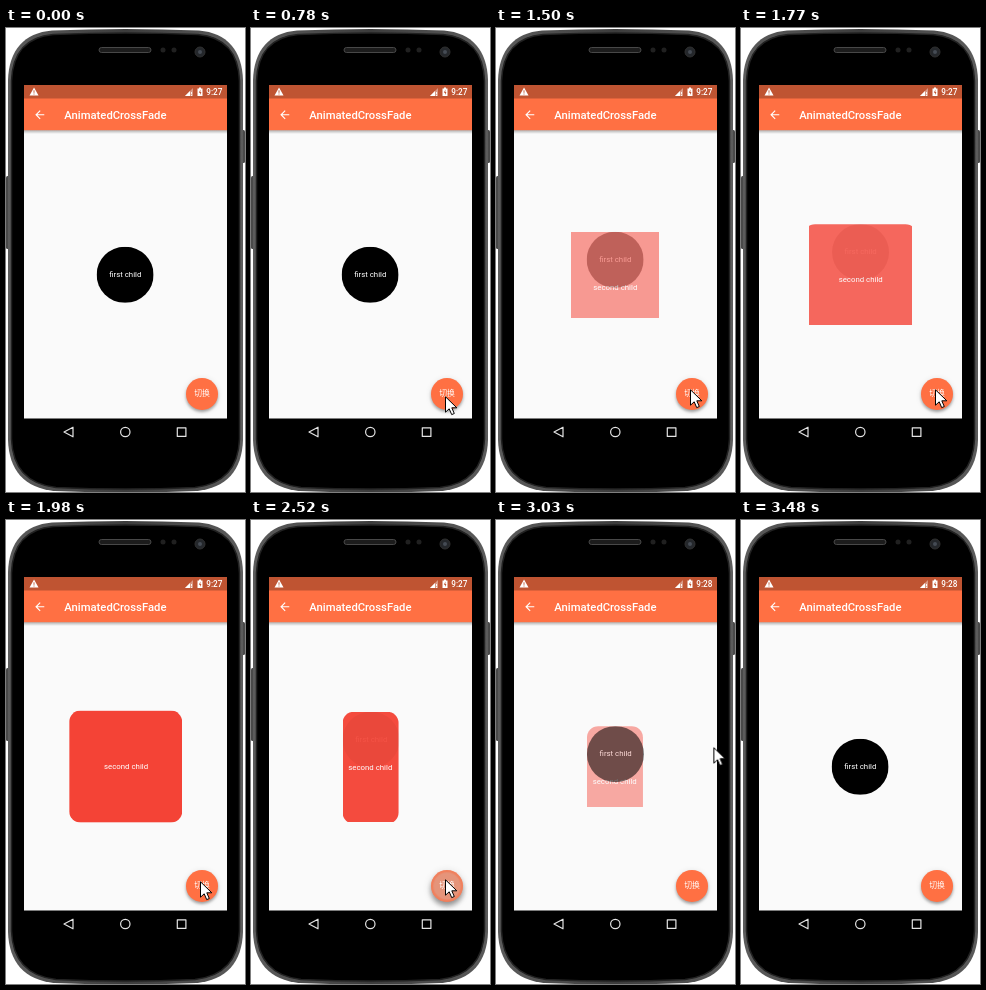
Animation of 239x464 px, one loop 3.96 s. Source, as an HTML page:

```html
<!DOCTYPE html>
<html lang="en">
<head>
<meta charset="utf-8">
<title>Cross fade demo</title>
<style>
  :root { --loop: 3960ms; --small: 56.4px; --large: 112.8px; --accent: #ff7043; }
  html, body { margin: 0; width: 100%; height: 100%; overflow: hidden; background: #fff; }
  body { position: relative; font: 7.84px Roboto, "Noto Sans CJK SC", "Noto Sans CJK", sans-serif; color: #fff; }
  svg, div { position: absolute; }
  svg { left: 0; top: 0; overflow: visible; }
  svg text { fill: #fff; font-weight: 500; }
  .size, .first, .second, .fab, .fab *, .cursor, .clock { animation: var(--loop) linear infinite; }

  /* Cross fade: forward 970-1970 ms, reverse 2480-3480 ms */
  .size {
    left: 119.3px; top: 246.5px; width: var(--small); height: var(--small);
    transform: translate(-50%, -50%); overflow: hidden; animation-name: size;
  }
  .first, .second { left: 50%; top: 0; transform: translateX(-50%); text-align: center; white-space: nowrap; }
  .first {
    width: var(--small); height: var(--small); line-height: var(--small);
    border-radius: 50%; background: #000; animation-name: first;
  }
  .second {
    width: var(--large); height: var(--large); line-height: var(--large);
    border-radius: 11.3px; background: #f44336; animation-name: second;
  }
  @keyframes size {
    0%, 24.495%, 87.879%, 100% { width: var(--small); height: var(--small); }
    49.747%, 62.626% { width: var(--large); height: var(--large); }
  }
  @keyframes first {
    0%, 24.495%, 87.879%, 100% { opacity: 1; }
    49.747%, 62.626% { opacity: 0; }
  }
  /* The outgoing child drops behind and takes the narrow width */
  @keyframes second {
    0%, 24.495% { opacity: 0; z-index: 1; width: var(--large); }
    49.747%, 62.626% { opacity: 1; z-index: 1; width: var(--large); }
    62.627% { opacity: 1; z-index: 0; width: var(--small); }
    87.879%, 100% { opacity: 0; z-index: 0; width: var(--small); }
  }

  .fab {
    left: 180.2px; top: 350px; width: 31.6px; height: 31.6px; border-radius: 50%;
    background: var(--accent); animation-name: lift;
  }
  .fab div { inset: 0; border-radius: 50%; text-align: center; line-height: 32px; }
  .ink { overflow: hidden; }
  .glow { background: #bcbcbc; opacity: 0; animation-name: glow; }
  .splash { background: #c8c8c8; opacity: 0; animation-name: splash; }
  @keyframes lift {
    0%, 24.2%, 31%, 59.1%, 69%, 100% { box-shadow: 0 2px 3px rgba(0,0,0,.32), 0 1px 6px rgba(0,0,0,.1); }
    26%, 62%, 64.5% { box-shadow: 0 4px 5px rgba(0,0,0,.34), 0 2px 9px rgba(0,0,0,.16); }
  }
  @keyframes glow {
    0%, 24.5%, 30.3%, 60%, 68.5%, 100% { opacity: 0; }
    26.5%, 62.6%, 64% { opacity: .22; }
  }
  @keyframes splash {
    0%, 24.5% { opacity: 0; transform: translateY(-6px) scale(.1); }
    25% { opacity: .3; transform: translateY(-4px) scale(.35); }
    29.5% { opacity: 0; transform: scale(1); }
    60% { opacity: 0; transform: translateY(-6px) scale(.1); }
    60.7% { opacity: .3; transform: translateY(-5px) scale(.3); }
    63.6% { opacity: .28; transform: scale(.85); }
    67.7%, 100% { opacity: 0; transform: scale(1); }
  }

  .clock { animation-name: before; animation-timing-function: step-end; }
  .later { animation-name: after; }
  @keyframes before { 0% { opacity: 1; } 68.18%, 100% { opacity: 0; } }
  @keyframes after { 0% { opacity: 0; } 68.18%, 100% { opacity: 1; } }

  .cursor { animation-name: point; }
  @keyframes point {
    0%, 3.78% { transform: translate(213px, 470px); }
    3.787% { transform: translate(213px, 448px); }
    6.06% { transform: translate(212px, 260px); }
    8.33% { transform: translate(205px, 127px); }
    10.6% { transform: translate(198px, 230px); }
    12.88% { transform: translate(192px, 350px); }
    14.39%, 17.42% { transform: translate(194px, 382px); }
    19.69%, 31.8% { transform: translate(194px, 368px); }
    34.1%, 59.09% { transform: translate(194px, 361px); }
    60.6%, 71.97% { transform: translate(194px, 359px); }
    76.515% { transform: translate(217px, 228px); }
    78.28% { transform: translate(240px, 150px); }
    78.5%, 100% { transform: translate(245px, 140px); }
  }
</style>
</head>
<body>
<svg width="239" height="464" viewBox="0 0 239 464">
  <defs>
    <linearGradient id="drop" x2="0" y2="1">
      <stop stop-opacity=".3"/>
      <stop offset="1" stop-opacity="0"/>
    </linearGradient>
    <linearGradient id="rim">
      <stop stop-color="#5c5c5c"/>
      <stop offset=".5" stop-color="#3c3c3c"/>
      <stop offset="1" stop-color="#5c5c5c"/>
    </linearGradient>
  </defs>

  <!-- phone -->
  <rect y="148" width="6" height="73" rx="1.5" fill="#4a4a4a"/>
  <rect x="233" y="102" width="6" height="33" rx="1.5" fill="#4a4a4a"/>
  <path d="M2 52C3 22 18 5 46 2.5Q119.500 -.5 193 2.500C221 5 236 22 237 52V412C236 442 221 460 190 463Q119.500 466 49 463C18 460 3 442 2 412Z" fill="url(#rim)"/>
  <path d="M5.500 53C6.500 25 20 9 47 6.500Q119.500 3.500 192 6.500C219 9 232.500 25 233.500 53V411C232.500 439 219 456 189 459.500Q119.500 462.500 50 459.500C20 456 6.500 439 5.500 411Z" fill="#000" stroke="#222" stroke-width="1.500"/>
  <rect x="93" y="19.500" width="52" height="5" rx="2.500" fill="#1c1c1c" stroke="#484848"/>
  <g fill="#202020">
    <circle cx="157" cy="22" r="2.500"/>
    <circle cx="168" cy="22" r="2.500"/>
  </g>
  <circle cx="194" cy="24" r="5" fill="#24272b" stroke="#303030"/>
  <circle cx="194" cy="24" r="2" fill="#454b54"/>

  <!-- screen -->
  <rect x="18" y="57" width="203" height="333.500" fill="#fafafa"/>
  <rect x="18" y="102" width="203" height="4" fill="url(#drop)"/>
  <rect x="18" y="57" width="203" height="45.200" fill="#ff7043"/>
  <rect x="18" y="57" width="203" height="13.500" fill="#000" opacity=".25"/>

  <!-- status bar -->
  <path d="M28 59.500L32.500 67.500H23.500Z" fill="#fff"/>
  <path d="M28 62.300V64.800M28 65.500V66.500" stroke="#bf5432" stroke-width=".9"/>
  <path d="M187 60V68H179Z" fill="#fff" opacity=".4"/>
  <path d="M184 63V68H179Z" fill="#fff"/>
  <path d="M185.500 64V66.300M185.500 67V68" stroke="#fff" stroke-width=".9"/>
  <path d="M191.500 60.500H193V59.500H195V60.500H196.500V68H191.500Z" fill="#fff"/>
  <path d="M194.500 61.500L192.800 64.700H194V67L195.400 63.900H194.300Z" fill="#bf5432"/>
  <g font-size="8.200">
    <text class="clock" x="200.300" y="66.800">9:27</text>
    <text class="clock later" x="200.300" y="66.800">9:28</text>
  </g>

  <!-- app bar -->
  <path transform="translate(27 80) scale(.564)" d="M20 11H7.830l5.590-5.590L12 4l-8 8 8 8 1.410-1.410L7.830 13H20z" fill="#fff"/>
  <text x="58.300" y="91" font-size="11.280">AnimatedCrossFade</text>

  <!-- navigation bar -->
  <g fill="none" stroke="#e4e4e4" stroke-width="1.200" stroke-linejoin="round">
    <path d="M58 404L67 399.200V408.800Z"/>
    <circle cx="119.300" cy="404" r="4.700"/>
    <rect x="171.300" y="399.800" width="8.600" height="8.600"/>
  </g>
</svg>

<div class="size">
  <div class="second">second child</div>
  <div class="first">first child</div>
</div>

<div class="fab">
  <div class="ink">
    <div class="glow"></div>
    <div class="splash"></div>
  </div>
  <div lang="zh-CN">切换</div>
</div>

<svg class="cursor" width="15" height="20">
  <path d="M.5 .8V16.200L4.200 12.800L6.700 18.600L9.300 17.500L6.800 11.800H11.800Z" fill="#fff" stroke="#000"/>
</svg>
</body>
</html>
```
